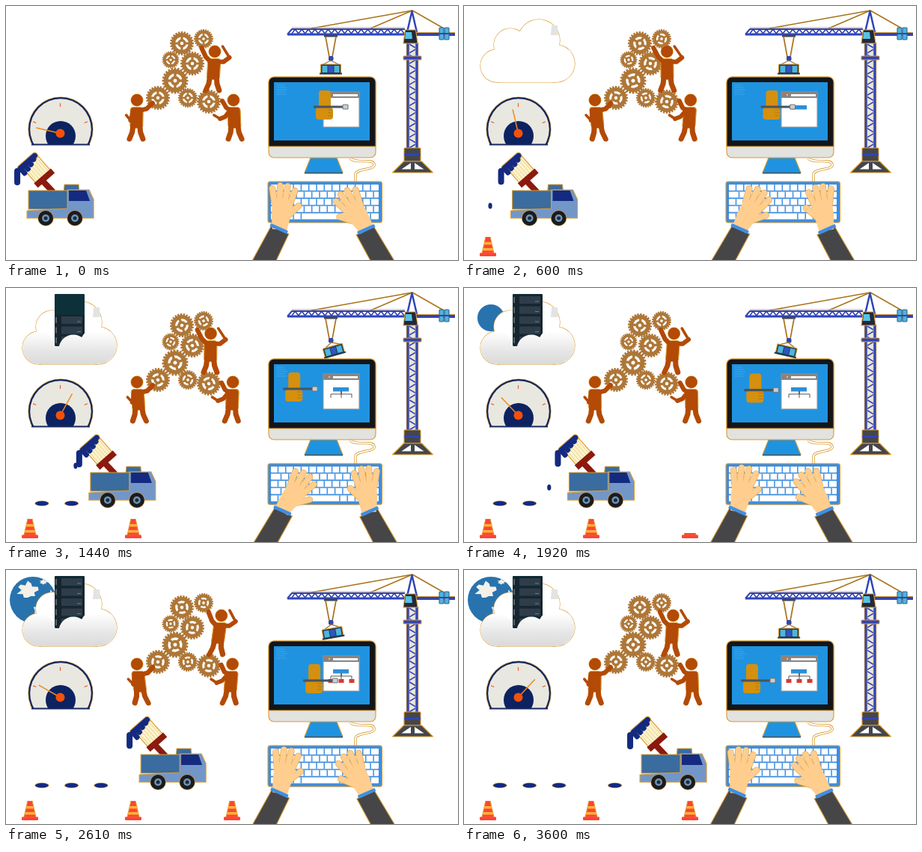
These frames come from a looping animation (604x340 px, 3630 ms). An HTML page with a canvas:

```html
<!DOCTYPE html>
<html>
<head>
<meta charset="utf-8">
<style>
  html, body { margin: 0; width: 604px; height: 340px; overflow: hidden; background: #fff; }
  canvas { display: block; }
</style>
</head>
<body>
<canvas id="stage" width="604" height="340"></canvas>
<script>
const g = document.getElementById('stage').getContext('2d');
const LOOP = 3630, TAU = Math.PI * 2;
const GOLD = '#d99c34', NAVY = '#142a80', RUST = '#b34a06', BROWN = '#ae7738';
const BLUE = '#2f45b8', SCREEN = '#1f93e0', DARK = '#45464b', WIRE = '#a8741c', SKIN = '#ffce8e';
const { sin, cos, min, max, abs } = Math;

// ---- drawing helpers ----
function paint(color, edge) {
  g.fillStyle = color;
  g.fill();
  if (edge) { g.strokeStyle = edge; g.lineWidth = 1.1; g.stroke(); }
}
function trace(pts) {
  g.beginPath();
  for (let i = 0; i < pts.length; i += 2) g.lineTo(pts[i], pts[i + 1]);
}
function line(color, width, ...pts) {
  trace(pts);
  g.strokeStyle = color;
  g.lineWidth = width;
  g.stroke();
}
function poly(color, pts, edge) { trace(pts); g.closePath(); paint(color, edge); }
function rect(color, x, y, w, h, r = 0, edge) {
  g.beginPath();
  g.roundRect(x, y, w, h, r);
  paint(color, edge);
}
function disc(color, x, y, rx, ry = rx) {
  g.beginPath();
  g.ellipse(x, y, rx, ry, 0, 0, TAU);
  paint(color);
}
// Upright trapezoid around a centre line.
function taper(color, x, y0, half0, y1, half1, edge) {
  poly(color, [x - half0, y0, x + half0, y0, x + half1, y1, x - half1, y1], edge);
}
function group(x, y, angle, draw) {
  g.save();
  g.translate(x, y);
  g.rotate(angle);
  draw();
  g.restore();
}
function clipped(x, y, w, h, draw) {
  g.save();
  g.beginPath();
  g.rect(x, y, w, h);
  g.clip();
  draw();
  g.restore();
}
function zigzag(x, y, w, h, n, vertical) {
  const pts = [];
  for (let i = 0; i <= n; i++) {
    pts.push(...(vertical ? [x + w * (i % 2), y + h * i / n] : [x + w * i / n, y + h * (i % 2)]));
  }
  line(BLUE, 1.6, ...pts);
}
// Ragged patch with a repeatable outline.
function patch(color, x, y, rx, ry, seed) {
  const pts = [];
  for (let i = 0; i < 16; i++) {
    const a = i / 16 * TAU, r = .75 + .25 * sin(seed * 7 + i * i * 3.1);
    pts.push(x + rx * r * cos(a), y + ry * r * sin(a));
  }
  poly(color, pts);
}

// ---- timing helpers ----
const span = (t, start, length) => min(1, max(0, (t - start) / length));
const ease = u => u * u * (3 - 2 * u);
const backOut = u => 1 + 3.6 * (u - 1) ** 3 + 2.6 * (u - 1) ** 2;

// ---- cloud, server, globe ----
function globe(t) {
  const s = span(t, 1800, 207);
  if (!s) return;
  group(36, 40, 0, () => {
    disc('#2873ae', 0, 0, 31 * s);
    g.globalAlpha = span(t, 2010, 200);
    patch('#f3f1e8', -7, -13, 16, 13, 1);
    patch('#f3f1e8', 14, -24, 6, 4, 2);
    patch('#f3f1e8', 7, 14, 7, 12, 3);
    patch('#f3f1e8', 25, -3, 5, 12, 4);
  });
}
function server(t) {
  clipped(60, 0, 50, 78, () => {
    g.translate(0, 70 * (1 - span(t, 700, 300)));
    rect('#0d3039', 65, 8, 40, 70, 1);
    for (let i = 0; i < 5; i++) {
      if (t < 1170 + i * 130) continue;
      const y = 65 - i * 13.5;
      rect('#18252e', 65, y - 2, 40, 13);
      rect('#2f3d4b', 74, y, 28, 10, 1);
      line('#8fa3ab', 1, 67, y + 1, 67, y + 9);
      line('#4f8a98', 1, 95, y + 7, 100, y + 7);
    }
  });
}
function cloud(t) {
  const lobes = [[44, 80, 22], [62, 52, 22], [100, 46, 28], [123, 77, 25]];
  const size = max(0, backOut(span(t, 60, 450)));
  if (t < 60) return;
  group(85, 61, 0, () => {
    g.scale(size, size);
    g.translate(-85, -61);
    for (const [color, grow] of [[GOLD, .6], ['#fff', 0]]) {
      for (const [x, y, r] of lobes) disc(color, x, y, r + grow);
      rect(color, 44, 55, 79, 47 + grow);
    }
    taper('#e3e3e3', 121, 26, 4, 39, 5);
  });
  if (t < 700) return;
  server(t);
  const shade = g.createLinearGradient(0, 58, 0, 102);
  shade.addColorStop(0, '#fff');
  shade.addColorStop(.6, '#e6e6e6');
  shade.addColorStop(1, '#dadada');
  g.globalAlpha = span(t, 700, 200);
  for (const [x, y, r] of [lobes[0], [90, 82, 20], lobes[3]]) disc(shade, x, y, r - .5);
  rect(shade, 44, 79, 79, 23);
  g.globalAlpha = 1;
}

// ---- gauge ----
function gauge(t) {
  clipped(28, 120, 92, 66, () => {
    disc(GOLD, 73, 165, 43.6);
    disc('#17265c', 73, 165, 43);
    disc('#e8e8e0', 73, 165, 40.8);
    disc('#0d2260', 73, 174, 20);
  });
  line('#17265c', 2, 34, 185.5, 112, 185.5);
  for (const a of [-1.2, 0, 1.2]) {
    group(72.5, 169, a, () => line('#f0602c', 1.2, 0, -39, 0, -34 - 5 * abs(a) * .1));
  }
  const degrees = -16 - 61 * cos(t / 2330 * TAU);
  group(72.5, 170.5, degrees * TAU / 360, () => line('#f08a20', 1.5, 0, 0, 0, -33));
  disc('#f4510b', 72.5, 170.5, 6);
}

// ---- road ----
function cone(t, x, start) {
  const h = 27 * span(t, start, 270);
  clipped(x - 14, 336 - h, 28, h, () => {
    taper('#ff4433', x, 309, 3, 331, 8, GOLD);
    taper('#ffb238', x, 316, 4.5, 319.5, 5.4);
    taper('#ffb238', x, 324, 6.3, 327.5, 7.1);
    rect('#ff4433', x - 11, 330.5, 22, 4.5, 1);
  });
}
function drop(t, start) {
  const u = (t - start) / 632, x = 41 + .0597 * start;
  if (u < 0) return;
  if (u < 1) return disc(NAVY, x - 34 * (1 - u ** 1.8), 238 + 50 * u * u, 2.6, 4);
  disc(GOLD, x, 288.3, 9.6, 3.6);
  disc(NAVY, x, 288.3, 8.8, 3);
}
function brush(t) {
  line('#8c1a0e', 8, 44, 229, 63, 249);
  // Bristles, ferrule and paint share a frame turned along the handle.
  group(40, 217.5, -.72, () => {
    rect('#fff3c8', -13, -14, 26, 29, 0, GOLD);
    for (let i = -10; i < 13; i += 4) line('#d8c58c', .7, i, -13, i, 14);
    rect('#8c1a0e', -15, 13, 30, 8);
    rect(NAVY, -19, -18, 33, 8, 4, GOLD);
    for (let i = 0; i < 4; i++) rect(NAVY, -19 + i * 7, -16, 7, 14 - i * 2 + sin(t / 120 + i), 3);
  });
  rect(NAVY, 11, 217, 8, 23 + sin(t / 115), 4);
}
function truck(t) {
  g.save();
  g.translate(t * .0575, 0);
  brush(t);
  taper('#3a6c9f', 87.5, 239, 9.5, 250, 10.5, GOLD);
  rect('#3a6c9f', 30, 247, 53, 25, 0, GOLD);
  poly('#7396c8', [82, 246, 111, 246, 117, 259, 117, 284, 28, 284, 28, 274, 82, 271], GOLD);
  poly(NAVY, [84, 247, 107, 247, 112, 261, 84, 261]);
  for (const x of [53, 92]) {
    disc(GOLD, x, 284, 10.6);
    disc('#1b1b20', x, 284, 10);
    disc('#6f95b0', x, 284, 5);
    disc('#1b2c40', x, 284, 2.5);
  }
  g.restore();
}

// ---- gears and crew ----
function gear(t, x, y, r, direction) {
  group(x, y, direction * t / LOOP * TAU / 2, () => {
    for (let k = 0; k < 24; k++) {
      const c = cos(k * TAU / 24), s = sin(k * TAU / 24);
      line(BROWN, r * .15, c * r * .8, s * r * .8, c * r, s * r);
    }
    disc(BROWN, 0, 0, r * .88);
    disc('#fff', 0, 0, r * .55);
    for (const a of [0, TAU / 4]) {
      const c = cos(a) * r * .6, s = sin(a) * r * .6;
      line(BROWN, r * .2, -c, -s, c, s);
    }
    disc(BROWN, 0, 0, r * .36);
    disc('#fff', 0, 0, r * .14);
  });
}
// Hands are offsets from the head; the second one holds the tool.
function person(x, y, lean, hands, tool) {
  g.save();
  g.lineCap = 'round';
  g.translate(x, y);
  disc(GOLD, 0, 0, 8.5);
  disc(RUST, 0, 0, 7.9);
  g.transform(1, 0, lean / 50, 1, 0, 0);
  rect(RUST, -8.5, 9.5, 17, 28, 4, GOLD);
  for (const side of [-1, 1]) line(RUST, 7, side * 4.5, 34, side * 5.5, 43, side * 9, 52);
  for (const [hx, hy] of hands) {
    const shoulder = hx < 0 ? -5 : 5;
    line(RUST, 6, shoulder, 13.5, (shoulder + hx) / 2, (13.5 + hy) / 2 + 3, hx, hy);
  }
  const [hx, hy] = hands[1];
  line(RUST, 3.5, hx, hy, hx + tool[0], hy + tool[1]);
  g.restore();
}
function crew(t) {
  const gears = [[235, 50, 16], [264, 44, 13], [220, 72, 11.5], [249, 77, 16],
    [226, 100, 17.5], [203, 123, 16], [243, 123, 13], [271, 128, 16]];
  gears.forEach(([x, y, r], i) => gear(t, x, y, r, i % 2 ? -1 : 1));
  const swing = sin(t / LOOP * TAU), step = 7 * abs(swing);
  person(279 - 9 * swing, 61, -3 + 4 * swing, [[-18, -5], [20, 8]], [-10, -15]);
  person(175, 126, step - 1, [[21, 4], [-8, 27]], [-6, -7]);
  person(304 - step * .2, 126, 2 - step * .9, [[-15, 1], [-19, 25]], [-8, -5]);
}

// ---- crane ----
function load(t) {
  const u = max(0, t - 1160);
  line(DARK, 3, 425, 40, 443, 40);
  for (const side of [-1, 1]) line(WIRE, 1.7, 434 + 7 * side, 41, 434 + 2 * side, 68);
  rect(BLUE, 431, 67, 6.5, 6.5, 2);
  group(434, 70, -.28 * sin(u / 1120 * TAU) * (1 - (u / 2470) ** 2), () => {
    line(WIRE, 1.3, -12, 9, 0, 3, 12, 9);
    rect('#1e3c55', -13.5, 8, 27, 13, 1, GOLD);
    for (let i = 0; i < 3; i++) rect(i % 2 ? '#2f55c0' : '#4fb4dc', -11.5 + i * 8, 10, 7, 9);
    line('#1e3c55', 2, -15, 20.5, 15, 20.5);
  });
}
function crane(t) {
  for (const x of [408, 487, 585]) line(WIRE, 1.5, x, 30, 543, 6);
  line(GOLD, 1, 382, 29, 533, 29);
  line(BLUE, 2, 533, 31, 382, 31, 376, 38);
  line(BLUE, 3, 376, 38, 533, 38);
  zigzag(382, 37, 150, -6, 34);
  line(BLUE, 4, 546, 38, 600, 38);
  line(GOLD, 1, 548, 35.5, 600, 35.5);
  for (const x of [579, 586]) rect('#4fb4dc', x, 29, 6, 16, 1, '#35618f');
  line(BLUE, 2, 579, 37, 592, 37);
  line(BLUE, 2.5, 536, 35, 542.5, 7, 549, 35);

  rect('#e9e6dc', 537, 50, 12, 142);
  zigzag(537, 50, 12, 141, 20, true);
  for (const x of [537, 549]) {
    line(GOLD, 4.4, x, 49, x, 192);
    line(BLUE, 3, x, 49, x, 192);
  }
  rect(BLUE, 531, 67, 24, 5, 1, GOLD);
  taper('#24283a', 540.5, 32, 7, 50, 9.5, GOLD);
  taper('#55c3e6', 538, 35, 4, 44, 5);
  rect(DARK, 532, 190, 22, 18, 1, GOLD);
  line(BLUE, 2, 532, 199, 554, 199);
  taper(DARK, 543.5, 208, 12, 223, 27, GOLD);
  for (const side of [-1, 1]) {
    poly('#fff', [543.5 + 2.5 * side, 210, 543.5 + 2.5 * side, 218.5, 543.5 + 15 * side, 218.5]);
  }
  load(t);
}

// ---- computer ----
function diagram(t) {
  rect('#fff', 424, 115, 48, 47, 0, '#9a9a9a');
  rect('#858585', 424, 115, 48, 8);
  rect('#fff', 437, 118, 33, 3);
  disc('#e65b43', 427.5, 119, 1.2);
  disc('#f0c040', 432, 119, 1.2);
  const width = 21 * span(t, 200, 300);
  rect('#2b8fd8', 458 - width, 133, width, 5.5);
  for (let i = 0; i < 3; i++) {
    const x = 462 - i * 14;
    clipped(430, 138, 37, 9 * span(t, 700, 500), () => line('#555', 1, 448, 138, 448, 142, x, 142, x, 147));
    if (t > 2250 + i * 180) rect('#d83a34', x - 3.5, 146, 7, 5);
  }
}
function painter(t) {
  const x = 414 - 41 * ease(span(t, 0, 1500)) + 31 * sin(span(t, 1750, 1400) * TAU / 2) ** 2;
  group(x, 135 + 13 * ease(span(t, 1750, 800)), 0, () => {
    rect('#d4900e', 4, -22, 16, 30, 4);
    rect('#d4900e', 0, 1, 23, 16, 4);
    for (let i = 0; i < 3; i++) line('#b57a10', 1, 16, 4 + i * 4, 22, 4 + i * 4);
    line('#4a5360', 3.2, -3, 0, 37, 0);
    rect('#c9ced2', 36, -3, 7, 6, 1, '#777');
  });
}
function monitor(t) {
  const cable = new Path2D('M460 204C468 212 490 203 492 212C494 220 466 217 467 226L467 235');
  for (const [color, width] of [[GOLD, 3.4], ['#fff', 1.8]]) {
    g.strokeStyle = color;
    g.lineWidth = width;
    g.stroke(cable);
  }
  taper(SCREEN, 424.5, 203, 17.5, 223, 25.5, GOLD);
  line('#1b5f96', 2, 399, 223.5, 450, 223.5);
  rect('#e2e2df', 351, 95, 143, 108, 7, GOLD);
  rect('#151517', 351, 95, 143, 93, [7, 7, 0, 0], GOLD);
  rect(SCREEN, 358, 102, 128, 78);
  for (let i = 0; i < 5; i++) line('#45a8ea', .8, 361, 106 + i * 3, 372 + i * 7 % 5, 106 + i * 3);
  diagram(t);
  painter(t);
}
// A fixed forearm with a hand that turns at the wrist.
function arm(x, y, side, base, turn) {
  const forearm = side * .42, c = cos(forearm) * 13, s = sin(forearm) * 13;
  poly('#464648', [base - 16, 341, x - c, y + 5 - s, x + c, y + 5 + s, base + 16, 341], GOLD);
  group(x, y, turn, () => {
    g.scale(side * 1.1, 1.1);
    g.lineCap = 'round';
    for (const [color, width] of [['#e0a850', 8], [SKIN, 6.8]]) {
      for (let i = 0; i < 4; i++) {
        const k = i - 1.5;
        line(color, width, k * 6.3, -28, k * 9.2, -50 + k * k * 2.2);
      }
      line(color, width, 7, -12, 20, -27);
    }
    g.lineCap = 'butt';
    taper(SKIN, 0, -33, 12.5, -12, 11.5);
    taper(SKIN, 0, -13, 11.6, 4, 9);
  });
  group(x, y, forearm, () => rect('#3f8fe4', -12.5, 1, 25, 4.5, 1));
}
function keyboard(t) {
  rect('#3d8de0', 350, 235, 152.5, 55, 3, GOLD);
  for (let row = 0; row < 5; row++) {
    const y = 239 + row * 9.6, inset = row % 2 * 4;
    rect('#fff', 354, y, 144, 8, 1);
    for (let x = 363.5 + inset; x < 495; x += 10.3) {
      if (row < 4 || x < 396 || x > 445) line('#3d8de0', 1.5, x, y, x, y + 8);
    }
  }
  const press = .5 - .5 * cos(t / LOOP * 4 * TAU);
  arm(366 + 5 * press, 295, 1, 345 + 2 * press, .1 + .55 * press);
  arm(480 + 5 * press, 296, -1, 503 + 4 * press, -.55 + .5 * press);
}

function draw(now) {
  const t = now % LOOP;
  g.lineJoin = 'round';
  g.clearRect(0, 0, 604, 340);
  globe(t);
  cloud(t);
  gauge(t);
  for (const start of [116, 780, 1440, 2690]) drop(t, start);
  truck(t);
  [32, 170, 302].forEach((x, i) => cone(t, x, 270 + 785 * i));
  crew(t);
  crane(t);
  monitor(t);
  keyboard(t);
  requestAnimationFrame(draw);
}
requestAnimationFrame(draw);
</script>
</body>
</html>
```
